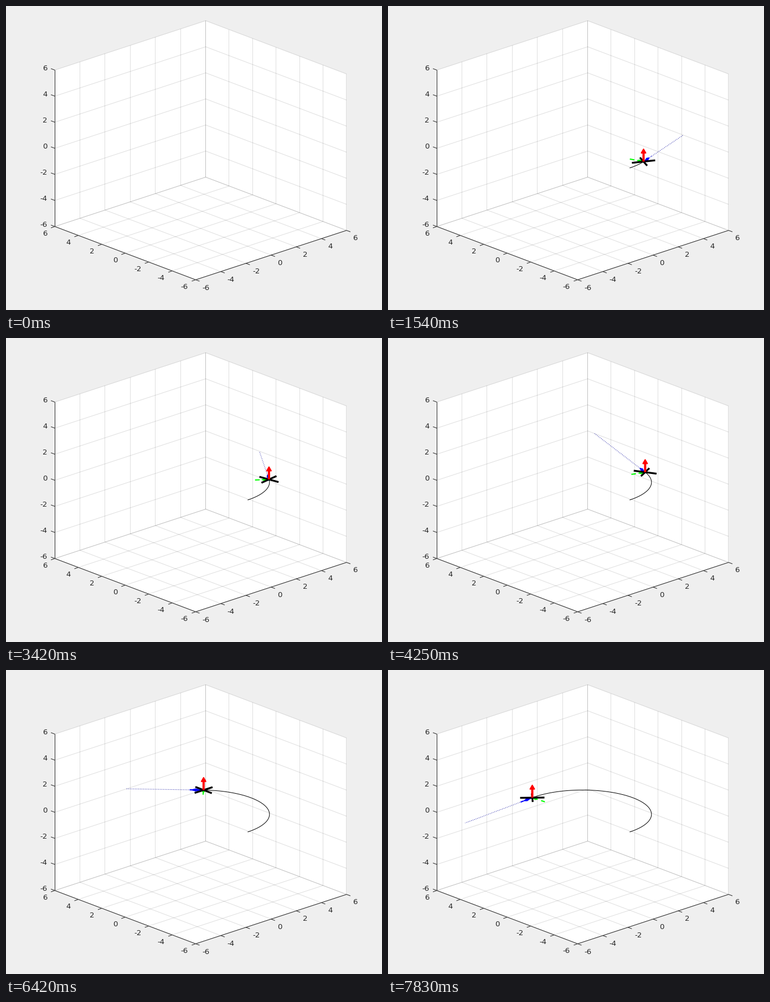
Write a matplotlib script that moves like this. It is 679 px wide and 548 px high and loops after 8 s.

```python
import numpy as np
import matplotlib.pyplot as plt
from matplotlib.animation import FuncAnimation
from matplotlib.collections import LineCollection
from matplotlib.patches import Polygon

W, H, DPI = 679, 548, 100
PX = 72 / DPI                      # one pixel in points
LOOP, STEP = 8000, 20
INK = (0.15, 0.15, 0.15)
LIM, R = 6, 4
TICKS = range(-6, 7, 2)

# Orthographic view: pixel offset of one unit along each axis
ORIGIN = np.array([351.55, 260.0])
BASIS = np.array([[272.45 / 12, -89 / 12], [-254.35 / 12, -8], [0, -23.5]])

# Moments at which the pose advances
RUNS = [(460, 1330, 6), (1540, 1710, 2), (1895, 2500, 4), (2790, 3420, 4),
        (3710, 4250, 4), (4460, 4750, 3), (4960, 5210, 2), (5330, 5830, 4),
        (6080, 6420, 3), (6580, 6920, 3), (7130, 7830, 5)]
MOVES = np.concatenate([np.linspace(*run) for run in RUNS])


def project(x, y, z=0):
    pts = np.stack(np.broadcast_arrays(x, y, z), axis=-1)
    return ORIGIN + pts @ BASIS


def direction(angle):
    return np.array([np.cos(angle), np.sin(angle)])


def circle(angle):
    return R * np.sin(angle), -R * np.cos(angle)


fig = plt.figure(figsize=(W / DPI, H / DPI), dpi=DPI, facecolor="#efefef")
ax = fig.add_axes([0, 0, 1, 1])
ax.set_xlim(0, W)
ax.set_ylim(H, 0)
ax.axis("off")


def crisp(seg):
    """Centre upright lines on the pixel column that holds them."""
    if abs(seg[0, 0] - seg[1, 0]) < 1e-6:
        seg[:, 0] = np.floor(seg[0, 0]) + 0.5
    return seg


def add_lines(segments, color):
    lines = LineCollection([crisp(s) for s in segments],
                           linewidths=PX, colors=[color])
    lines.set_snap(False)
    ax.add_collection(lines)


def draw_box():
    s = np.array([-LIM, LIM, LIM, -LIM])
    t = np.array([-LIM, -LIM, LIM, LIM])
    for face in (project(s, t, -LIM), project(s, LIM, t), project(LIM, s, t)):
        ax.add_patch(Polygon(face, fc="white", ec="none"))
    ends = np.array([-LIM, LIM])
    grid = []
    for v in TICKS:
        grid += [project(v, ends, -LIM), project(ends, v, -LIM),
                 project(v, LIM, ends), project(ends, LIM, v),
                 project(LIM, v, ends), project(LIM, ends, v)]
    add_lines(grid, (*INK, 0.15))

    axes = [project(ends, -LIM, -LIM), project(-LIM, ends, -LIM),
            project(-LIM, LIM, ends)]
    for v in TICKS:
        for base, off in ((project(v, -LIM, -LIM), (7, 2.6)),
                          (project(-LIM, v, -LIM), (-7, 2.5)),
                          (project(-LIM, LIM, v), (-7, -2.6))):
            axes.append(np.array([base, base + off]))
    add_lines(axes, INK)


def draw_labels():
    def label(pos, dx, dy, text, side):
        ax.text(pos[0] + dx, pos[1] + dy, text, ha=side, va="baseline",
                color=INK, family="DejaVu Sans", size=13.33 * PX)

    for v in TICKS:
        label(project(v, -LIM, -LIM), 11.6, 18, str(v), "left")
        label(project(-LIM, v, -LIM), -13.4, 17, str(v), "right")
        label(project(-LIM, LIM, v), -13.2, 0.8, str(v), "right")


def add_line(width, color, **style):
    return ax.plot([], [], lw=width * PX, color=color, snap=False,
                   dash_capstyle="butt", solid_capstyle="butt", **style)[0]


def add_blob(color, edge):
    shape = Polygon(np.zeros((3, 2)), fc=color, ec=color, lw=edge * PX,
                    joinstyle="round", snap=False)
    return ax.add_patch(shape)


draw_box()
draw_labels()

DASH = (0, (4, 4))
trail = add_line(1, "black")
ray = add_line(1, (0, 0, 0.6), linestyle=(0, (1, 2)))
side = add_line(2.1, "lime", linestyle=DASH)
side_blob = add_blob("lime", 1.2)
nose = add_line(2.1, "blue", linestyle=DASH)
nose_blob = add_blob("blue", 1.2)
arms = [add_line(3.3, "black") for _ in range(2)]
mast = add_line(4, "red")
mast_head = add_blob("red", 2)
craft = [trail, ray, side, side_blob, nose, nose_blob, *arms, mast, mast_head]
for order, part in enumerate(craft):
    part.set_zorder(5 + order)


def set_line(line, pts):
    line.set_data(pts[:, 0], pts[:, 1])


def set_arrow(line, blob, pos, vec, start, end, half):
    """Dashed unit arrow with a leaf-shaped swelling."""
    base, tip = project(*pos), project(*(pos + vec))
    d = tip - base
    across = np.array([-d[1], d[0]]) / np.hypot(*d) * half
    mid = base + d * (0.45 * start + 0.55 * end)
    set_line(line, np.array([base, tip]))
    blob.set_xy([base + d * start, mid + across, base + d * end, mid - across])


def ray_length(pos, d):
    """Distance from pos along d to the walls of the box."""
    return min((np.sign(v) * LIM - p) / v for p, v in zip(pos, d) if abs(v) > 1e-9)


def update(k):
    n = np.searchsorted(MOVES, k * STEP + STEP / 2, side="right") - 1
    for part in craft:
        part.set_visible(n >= 0)
    if n < 0:
        return craft

    yaw = np.radians(0.4 + 2.845 * n + 0.0478 * n * n)
    pos = np.array(circle(yaw))
    ahead = direction(yaw)

    set_line(trail, project(*circle(np.linspace(0, yaw, 90))))
    end = pos + ahead * ray_length(pos, ahead)
    set_line(ray, np.array([project(*pos), project(*end)]))
    set_arrow(side, side_blob, pos, direction(yaw + np.pi / 2), 0.05, 0.42, 1.8)
    set_arrow(nose, nose_blob, pos, ahead, 0.15, 0.72, 2.1)
    for arm, turn in zip(arms, (-np.pi / 4, np.pi / 4)):
        half = direction(yaw + turn) * np.sqrt(0.5)
        set_line(arm, np.array([project(*(pos - half)), project(*(pos + half))]))

    x, y = project(*pos)
    mast.set_data([x, x], [y, y - 17])
    mast_head.set_xy([(x, y - 22.5), (x - 4, y - 15.5), (x + 4, y - 15.5)])
    return craft


anim = FuncAnimation(fig, update, frames=LOOP // STEP, interval=STEP,
                     repeat=True, repeat_delay=0, blit=False)
plt.show()
```
